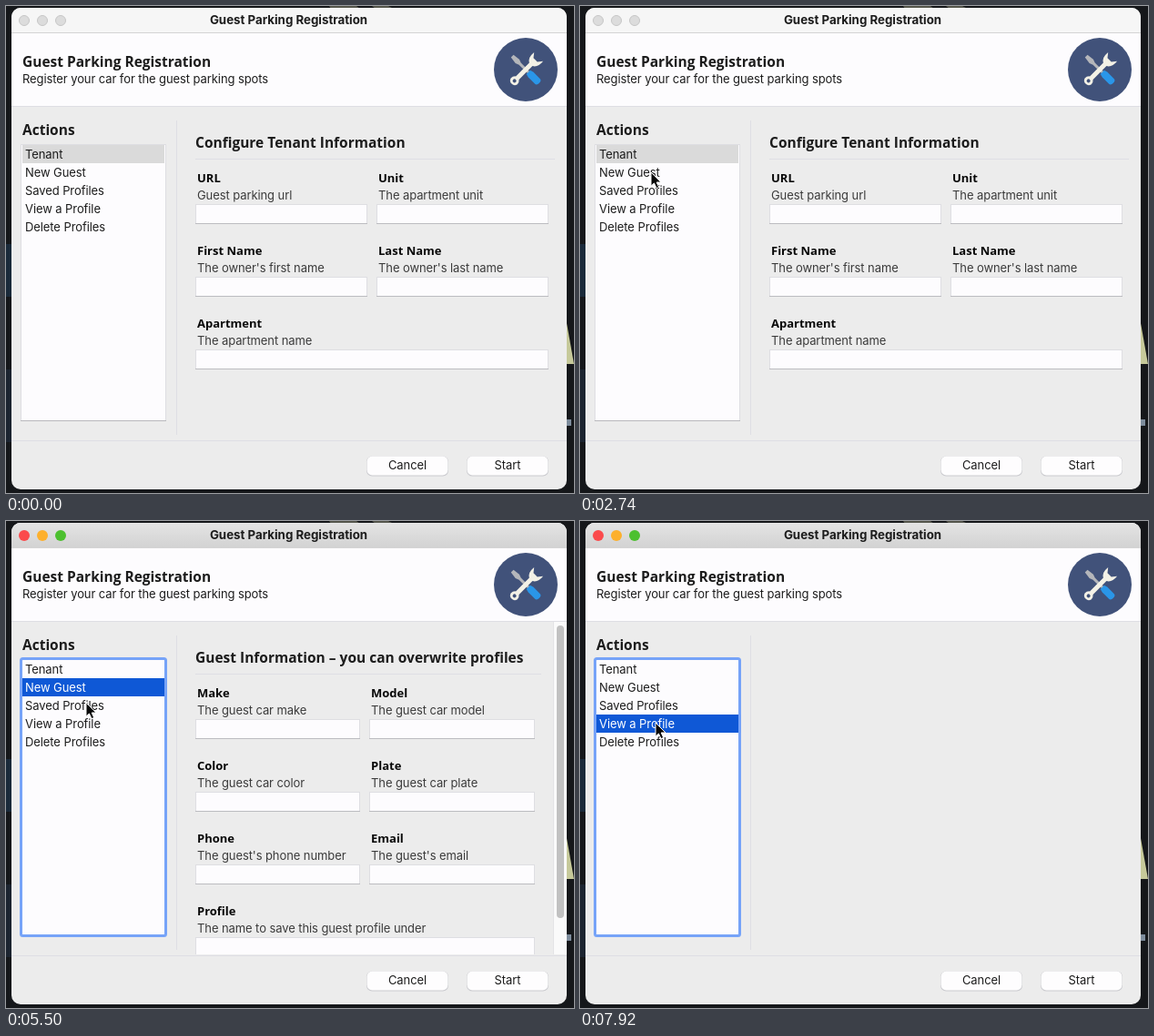
Recreate the animation shown at these times as an HTML page. Size 624x536 px, loop 8000 ms.

```html
<!DOCTYPE html>
<html lang="en">
<head>
<meta charset="utf-8">
<title>Guest Parking Registration</title>
<style>
html, body { margin: 0; width: 100%; height: 100%; overflow: hidden; background: #15171a; }
svg { display: block; width: 624px; height: 536px; }
text { font: 13px Inter, sans-serif; letter-spacing: -.09px; fill: #1c1c1c; }
.title { font-weight: 700; font-size: 13.3px; letter-spacing: 0; text-anchor: middle; }
.mid { text-anchor: middle; }
.head { font: 700 15.5px "Open Sans", sans-serif; letter-spacing: 0; }
.label { font: 700 13px "Open Sans", sans-serif; letter-spacing: 0; fill: #080808; }
.hint { fill: #3b3b3b; }
.on-blue { fill: #fff; }
.rule { stroke: #dedee4; }

.timed { animation: 8s step-end infinite; visibility: hidden; }
.inactive { animation-name: inactive; visibility: visible; }
.active { animation-name: active; }
.ring { animation-name: ring; }
.tenant { animation-name: tenant; visibility: visible; }
.guest { animation-name: guest; }
.row0 { animation-name: row0; }
.row1 { animation-name: row1; }
.row2 { animation-name: row2; }
.row3 { animation-name: row3; }
@keyframes inactive { 0% { visibility: visible } 36.5%, 100% { visibility: hidden } }
@keyframes active { 0% { visibility: hidden } 36.5%, 100% { visibility: visible } }
@keyframes ring {
  0%, 55.5%, 80.5% { visibility: hidden }
  36.5%, 58.5%, 83%, 100% { visibility: visible }
}
@keyframes tenant { 0% { visibility: visible } 55.5%, 100% { visibility: hidden } }
@keyframes guest { 0%, 80.5%, 100% { visibility: hidden } 55.5% { visibility: visible } }
@keyframes row0 { 0%, 55%, 100% { visibility: hidden } 36.5% { visibility: visible } }
@keyframes row1 { 0%, 79%, 100% { visibility: hidden } 55% { visibility: visible } }
@keyframes row2 { 0%, 97%, 100% { visibility: hidden } 79% { visibility: visible } }
@keyframes row3 { 0% { visibility: hidden } 97%, 100% { visibility: visible } }

.cursor { animation: cursor 8s ease-in-out infinite; }
@keyframes cursor {
  0%, 2% { transform: translate(640px, 420px) }
  15%, 30% { transform: translate(81px, 184px) }
  34%, 61% { transform: translate(78px, 183px) }
  67%, 87% { transform: translate(88px, 200px) }
  94%, 100% { transform: translate(83px, 222px) }
}
</style>
</head>
<body>
<svg viewBox="0 0 624 536">
  <defs>
    <linearGradient id="bar" x2="0" y2="1">
      <stop stop-color="#e4e4e4"/><stop offset="1" stop-color="#d2d2d2"/>
    </linearGradient>
    <clipPath id="window"><rect x="6" y="2" width="610" height="530" rx="10"/></clipPath>
    <clipPath id="pane"><rect x="188" y="111" width="428" height="366"/></clipPath>
  </defs>

  <!-- desktop showing around the window -->
  <rect width="624" height="536" fill="#15171a"/>
  <path d="M0 262h6v58H0z" fill="#1a2a3a"/>
  <path d="M0 400h6v80H0z" fill="#1c2430"/>
  <path d="M355 0h30l4 3h-32zM402 0h18l6 3h-20z" fill="#55564c"/>
  <path d="M614 338L624 394H614z" fill="#c6c99a"/>
  <path d="M616 455h5v7h-5z" fill="#7d8c9c"/>

  <g clip-path="url(#window)">
    <rect x="6" y="2" width="610" height="530" fill="#ececec"/>
    <rect x="6" y="2" width="610" height="28" fill="#f6f6f6"/>
    <g fill="#dcdcdc" stroke="#c6c6c6">
      <circle cx="20" cy="16" r="5.5"/><circle cx="40" cy="16" r="5.5"/><circle cx="60" cy="16" r="5.5"/>
    </g>
    <g class="timed active">
      <rect x="6" y="2" width="610" height="28" fill="url(#bar)"/>
      <circle cx="20" cy="16" r="6" fill="#fb4a4c"/>
      <circle cx="40" cy="16" r="6" fill="#fdb02c"/>
      <circle cx="60" cy="16" r="6" fill="#4cc02f"/>
    </g>
    <path d="M6 29.5h610" stroke="#d4d4d4"/>
    <rect x="6" y="30" width="610" height="80" fill="#fdfcfe"/>
    <path class="rule" d="M6 110.5h610M6 478.5h610M187.5 126v346"/>
  </g>
  <text class="title" x="310.5" y="20">Guest Parking Registration</text>
  <text class="head" x="18" y="67">Guest Parking Registration</text>
  <text x="18" y="85">Register your car for the guest parking spots</text>

  <!-- crossed screwdriver and wrench -->
  <circle cx="571" cy="70" r="35" fill="#41527a"/>
  <g transform="translate(571 70) rotate(-45)">
    <path d="M-1.5 5V-9L-3-13L-2-21H2L3-13L1.5-9V5z" fill="#b4b6ba"/>
    <path d="M-3 4H3L4 8V18Q4 21 0 21Q-4 21-4 18V8z" fill="#2a96e8"/>
    <path d="M-13-2.5H8Q11-8 20-7L15-3V3L20 7Q11 8 8 2.5H-13Q-15 5-18 5Q-22 4-22 0Q-22-4-18-5Q-15-5-13-2.5z"
      fill="#f3f1e6"/>
    <circle cx="-17.5" r="2" fill="#41527a"/>
  </g>

  <text class="head" x="18" y="142">Actions</text>
  <g id="list"></g>
  <g id="tenant" class="timed tenant"></g>
  <g clip-path="url(#pane)"><g id="guest" class="timed guest"></g></g>
  <g id="buttons"></g>

  <path class="cursor" d="M0 0V15.2L3.4 12L6 17.6L8.7 16.4L6.2 11H11z" fill="#080808" stroke="#fff"/>
</svg>
<script>
const byId = id => document.getElementById(id);
const rect = (x, y, w, h, fill, extra = '') =>
  `<rect x="${x}" y="${y}" width="${w}" height="${h}" fill="${fill}" ${extra}/>`;
const text = (x, y, content, cls = '') => `<text class="${cls}" x="${x}" y="${y}">${content}</text>`;

const field = (x, row, width, label, hint) => {
  const y = 218 + row * 80;
  return text(x + 2, y - 24, label, 'label') + text(x + 2, y - 5, hint, 'hint') +
    rect(x + .5, y + .5, width - 1, 21, '#fdfcfe', 'stroke="#dedee2"') +
    rect(x, y + 21, width, 1, '#bcbcc0');
};

const heading = (content, right) =>
  text(208, 156, content, 'head') + `<path class="rule" d="M208 168.5H${right}"/>`;

const actions = ['Tenant', 'New Guest', 'Saved Profiles', 'View a Profile', 'Delete Profiles'];
const rowText = (i, cls) => text(21, 168 + i * 20, actions[i], cls);
const selection = i => `<g class="timed row${i}">` +
  rect(18, 153 + i * 20, 156, 20, '#0f58d6') + rowText(i, 'on-blue') + '</g>';

byId('list').innerHTML =
  rect(16.5, 152.5, 159, 304, '#fdfcfe', 'stroke="#dedee2"') +
  rect(16, 456, 160, 1, '#b8b8bc') +
  rect(18, 153, 156, 20, '#dadada', 'class="timed inactive"') +
  actions.map((_, i) => rowText(i)).join('') +
  [0, 1, 2, 3].map(selection).join('') +
  rect(16.5, 151.5, 159, 305, 'none', 'class="timed ring" rx="2" stroke="#76a3f8" stroke-width="3"');

byId('tenant').innerHTML = heading('Configure Tenant Information', 603) +
  field(208, 0, 189, 'URL', 'Guest parking url') +
  field(407, 0, 189, 'Unit', 'The apartment unit') +
  field(208, 1, 189, 'First Name', "The owner's first name") +
  field(407, 1, 189, 'Last Name', "The owner's last name") +
  field(208, 2, 388, 'Apartment', 'The apartment name');

byId('guest').innerHTML = heading('Guest Information – you can overwrite profiles', 588) +
  field(208, 0, 181, 'Make', 'The guest car make') +
  field(399, 0, 182, 'Model', 'The guest car model') +
  field(208, 1, 181, 'Color', 'The guest car color') +
  field(399, 1, 182, 'Plate', 'The guest car plate') +
  field(208, 2, 181, 'Phone', "The guest's phone number") +
  field(399, 2, 182, 'Email', "The guest's email") +
  field(208, 3, 373, 'Profile', 'The name to save this guest profile under') +
  rect(601, 111, 15, 366, '#fafafa') + rect(601, 111, 1, 366, '#e4e4e6') +
  rect(605, 115, 8, 322, '#c1c1c1', 'rx="4"');

byId('buttons').innerHTML = [[396, 'Cancel'], [506, 'Start']].map(([x, name]) =>
  rect(x, 495.5, 90, 22, '#cbcbcf', 'rx="6"') + rect(x + .5, 495.5, 89, 21, '#fefdfe', 'rx="6"') +
  text(x + 45, 510, name, 'mid')).join('');
</script>
</body>
</html>
```
